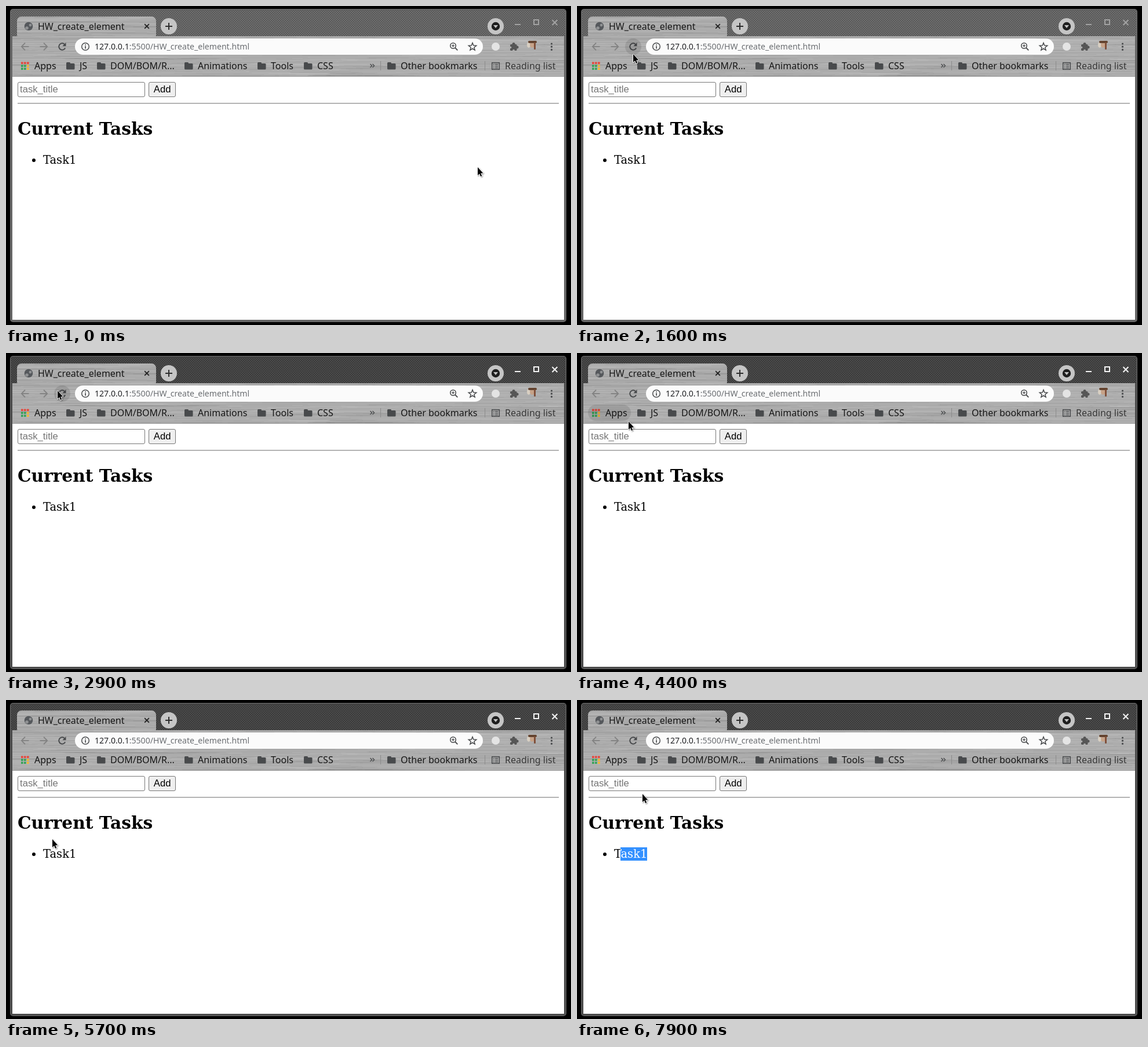
An HTML page with a canvas for the animation above (8000 ms loop, 975 by 550 pixels).

```html
<!DOCTYPE html>
<html lang="en">
<head>
<meta charset="utf-8">
<title>Task list</title>
<style>
html, body { margin: 0; width: 100%; height: 100%; overflow: hidden; background: #000; }
canvas { display: block; }
</style>
</head>
<body>
<canvas id="stage" width="975" height="550"></canvas>
<script>
const LOOP = 8000, STEP = 100, FOCUS_AT = 2900;
const W = 975, H = 550;
const UI = '"Noto Sans", sans-serif', LABEL = '16px ' + UI;
const SERIF = '"DejaVu Serif", serif', ITEM = '19.5px ' + SERIF;
const FORM = '16.67px "Liberation Sans", Arial, sans-serif';
const INK = '#484a4c', METAL = '#adadad';
const view = document.getElementById('stage').getContext('2d');
let c = view;

// Pointer key points: time, x, y
const PATH = [
  [100, 814, 278], [900, 337, 167], [1000, 272, 152], [1400, 102, 95],
  [1900, 89, 65], [2000, 84, 63], [2400, 89, 65], [3500, 89, 65],
  [4400, 89, 118], [5300, 85, 214], [5700, 80, 240], [6200, 88, 267],
  [6700, 176, 265], [7100, 133, 212], [7900, 113, 162]
];

function pointerAt(t) {
  const next = PATH.findIndex(k => k[0] >= t);
  const a = PATH[Math.max(next - 1, 0)], b = PATH[next];
  const p = Math.max(0, (t - a[0]) / (b[0] - a[0] || 1));
  const mix = i => Math.round(a[i] + (b[i] - a[i]) * p);
  return { x: mix(1), y: mix(2) };
}

const inside = (p, x, y, w, h) => p.x >= x && p.x < x + w && p.y >= y && p.y < y + h;

function rng(seed) {
  return () => (seed = (seed * 16807) % 2147483647) / 2147483647;
}

function rect(x, y, w, h, color) {
  c.fillStyle = color;
  c.fillRect(x, y, w, h);
}

function pill(x, y, w, h, r, color) {
  c.fillStyle = color;
  c.beginPath();
  c.roundRect(x, y, w, h, r);
  c.fill();
}

function disc(x, y, r, color, ry = r) {
  c.fillStyle = color;
  c.beginPath();
  c.ellipse(x, y, r, ry, 0, 0, Math.PI * 2);
  c.fill();
}

function stroke(color, width) {
  c.strokeStyle = color;
  c.lineWidth = width;
  c.stroke();
}

function ring(x, y, r, color, width) {
  c.beginPath();
  c.arc(x, y, r, 0, Math.PI * 2);
  stroke(color, width);
}

function line(color, width, ...pts) {
  c.beginPath();
  for (let i = 0; i < pts.length; i += 2) c.lineTo(pts[i], pts[i + 1]);
  stroke(color, width);
}

function poly(color, ...pts) {
  c.fillStyle = color;
  c.beginPath();
  for (let i = 0; i < pts.length; i += 2) c.lineTo(pts[i], pts[i + 1]);
  c.closePath();
  c.fill();
}

// Crossing strokes; turn them by 45 degrees for a close mark
function cross(x, y, r, color, width, angle = 0) {
  c.save();
  c.translate(x, y);
  c.rotate(angle);
  line(color, width, -r, 0, r, 0);
  line(color, width, 0, -r, 0, r);
  c.restore();
}

function chevron(x, y, dx, dy, color, width) {
  line(color, width, x - dx, y - dy, x, y, x - dx, y + dy);
}

function text(s, x, y, font, color) {
  c.font = font;
  c.fillStyle = color;
  c.fillText(s, x, y);
}

function titleBar(focused) {
  pill(7, 5, 960, 540, 5, '#6c6c6c');
  pill(8, 6, 958, 538, 4, focused ? '#4b4b4b' : '#666');
  rect(9, 7, 956, 45, focused ? '#434343' : '#676767');
  for (let y = 7; y < 52; y += 2)
    for (let x = 9 + y % 4 - 1; x < 964; x += 4) {
      rect(x, y, 2, 1, 'rgba(0,0,0,.28)');
      rect(x, y + 1, 2, 1, 'rgba(255,255,255,.1)');
    }
  const ink = focused ? '#f4f4f4' : '#a2a2a2';
  rect(878, 31, 10, 2, ink);
  c.strokeStyle = ink;
  c.lineWidth = 2;
  c.strokeRect(911, 24, 8, 8);
  cross(947, 28.5, 6.3, ink, 2, Math.PI / 4);
}

function brushedMetal() {
  const rand = rng(77);
  c.save();
  c.beginPath();
  c.roundRect(19, 18, 240, 40, 8);
  c.rect(11, 52, 952, 70);
  c.clip();
  rect(11, 18, 952, 104, METAL);
  for (let i = 0; i < 1100; i++) {
    const x = rand() * 1100 - 120, y = 18 + Math.floor(rand() * 104);
    rect(x, y, 40 + rand() * 220, 1, rand() < 0.5 ? 'rgba(255,255,255,.06)' : 'rgba(0,0,0,.045)');
  }
  rect(11, 121, 952, 1, '#989898');
  c.restore();
}

function tabStrip() {
  disc(39, 35, 7.3, '#55585c');
  disc(36, 38, 2.8, '#8f9193');
  disc(42, 33, 2.4, '#8f9193');
  text('HW_create_element', 55, 41, LABEL, '#161616');
  cross(243, 35, 5.4, '#222', 1.8, Math.PI / 4);
  for (const x of [281, 845]) disc(x, 35, 14, '#c5c5c5');
  cross(281, 35, 6, '#2d2d2d', 2);
  disc(845, 35, 7.2, '#1e1e1e');
  poly('#c5c5c5', 841, 33, 849, 33, 845, 38);
}

function arrowIcon(x, dir) {
  c.save();
  c.translate(x, 70);
  c.scale(dir, 1);
  line('#828282', 1.8, -6.5, 0, 6, 0);
  chevron(6.2, 0, 6.2, 6.3, '#828282', 1.8);
  c.restore();
}

function star(x, y) {
  c.beginPath();
  for (let i = 0; i < 10; i++) {
    const a = -Math.PI / 2 + i * Math.PI / 5, r = i % 2 ? 3 : 7;
    c.lineTo(x + r * Math.cos(a), y + r * Math.sin(a));
  }
  c.closePath();
  stroke(INK, 1.5);
}

function reloadIcon() {
  c.beginPath();
  c.arc(97, 70, 5.7, 0.45, Math.PI * 2 - 0.75);
  stroke(INK, 1.9);
  poly(INK, 103.5, 63, 103.5, 69.3, 97.3, 69.3);
}

function addressBar() {
  pill(119, 56, 704, 28, 14, '#fbfbfb');
  ring(137, 70, 6.3, INK, 1.5);
  rect(136.2, 69, 1.7, 4.6, INK);
  rect(136.2, 66.2, 1.7, 1.7, INK);
  const font = '14.1px ' + UI, host = '127.0.0.1';
  text(host, 153, 75, font, '#202124');
  text(':5500/HW_create_element.html', 153 + c.measureText(host).width, 75, font, '#6b6e72');
  ring(771.5, 68.5, 4.7, INK, 1.6);
  line(INK, 1.8, 775, 72, 779.3, 76.3);
  cross(771.5, 68.5, 2.5, INK, 1.2);
  star(805, 70.5);
}

function extensions() {
  disc(845, 70, 7, '#e4e4e4');
  pill(870, 66, 11.5, 11, 1.5, '#565656');
  disc(876, 65.5, 2.5, '#565656');
  disc(882, 71, 2.5, '#565656');
  disc(870.6, 71.5, 1.8, METAL);
  disc(876, 76.6, 1.8, METAL);
  // Profile picture as flat tones
  disc(902, 67, 3, '#d8cfc2', 5);
  disc(908, 67, 4, '#c6a288', 5);
  pill(901, 60, 15, 4, 2, '#63432f');
  pill(911, 63, 3, 12, 1, '#80503a');
  for (let i = -1; i < 2; i++) disc(941.5, 70.2 + i * 5.2, 1.6, INK);
}

function folder(x) {
  pill(x, 97, 7, 5, 1.5, INK);
  pill(x, 99, 14.5, 10.5, 1.5, INK);
}

function bookmarks() {
  const colors = ['#e8473c', '#35a457', '#f3b733'];
  for (let i = 0; i < 9; i++) {
    const row = Math.floor(i / 3), col = i % 3;
    rect(26 + col * 5, 96.5 + row * 5, 3.6, 3.6, colors[row && 1 + (col > 1)]);
  }
  text('Apps', 49, 109, LABEL, '#161616');
  const names = { JS: 104, 'DOM/BOM/R...': 157, Animations: 308, Tools: 434, CSS: 514, 'Other bookmarks': 658 };
  for (const name in names) {
    folder(names[name]);
    text(name, names[name] + 23, 109, LABEL, '#161616');
  }
  for (const x of [631.5, 635.5]) chevron(x, 103, 3, 3, INK, 1.4);
  for (const x of [646, 826]) rect(x, 95, 1, 16, '#8b8b8b');
  c.strokeStyle = INK;
  c.lineWidth = 1.5;
  c.strokeRect(838.7, 97.7, 12.6, 11.6);
  for (let y = 100; y < 108; y += 3) {
    rect(841, y, 1.5, 1.3, INK);
    rect(844, y, 5, 1.3, INK);
  }
  text('Reading list', 861, 109, LABEL, '#363636');
}

function page() {
  rect(11, 122, 952, 419, '#fff');
  rect(20, 167, 934, 1, '#9a9a9a');
  rect(20, 168, 934, 1, '#cfcfcf');
  text('Current Tasks', 20, 222, 'bold 29.65px ' + SERIF, '#000');
  disc(48, 266, 3, '#000');
}

function makeWindow(focused) {
  const layer = document.createElement('canvas');
  layer.width = W;
  layer.height = H;
  c = layer.getContext('2d');
  rect(0, 0, W, H, '#000');
  titleBar(focused);
  brushedMetal();
  tabStrip();
  arrowIcon(33, -1);
  arrowIcon(65, 1);
  reloadIcon();
  addressBar();
  extensions();
  bookmarks();
  page();
  c = view;
  return layer;
}

function control(x, w, fill, hover) {
  pill(x + 0.5, 131.5, w - 1, 25, 2.5, fill);
  stroke(hover ? '#4f4f4f' : '#767676', 1);
}

function form(p) {
  const onButton = inside(p, 246, 131, 47, 26);
  control(20, 220, '#fff', inside(p, 20, 131, 220, 26));
  control(246, 47, onButton ? '#e5e5e5' : '#efefef', onButton);
  text('task_title', 24, 149, FORM, '#757575');
  text('Add', 254.8, 149, FORM, '#000');
}

function task(t) {
  const word = 'Task1', x = 64, base = 272;
  text(word, x, base, ITEM, '#000');
  if (t < 6100) return;
  const full = c.measureText(word).width;
  const edge = i => x + full - c.measureText(word.slice(i)).width;
  const grip = pointerAt(Math.min(t, 6700)).x;
  const end = [1, 2, 3, 4, 5].map(edge)
    .reduce((a, b) => Math.abs(b - grip) < Math.abs(a - grip) ? b : a);
  const left = Math.floor(edge(1)), width = Math.round(end) - left;
  c.save();
  c.beginPath();
  c.rect(left, 254, width, 23);
  c.clip();
  rect(left, 254, width, 23, '#3390ff');
  text(word, x, base, ITEM, '#fff');
  c.restore();
}

function hovers(p) {
  const shade = 'rgba(0,0,0,.1)';
  if (Math.hypot(p.x - 97, p.y - 70) < 15) disc(97, 70, 14, shade);
  if (inside(p, 19, 89, 76, 30)) pill(19, 89, 74, 28, 14, shade);
  if (inside(p, 96, 89, 52, 28)) pill(96, 89, 52, 28, 14, shade);
}

function textBeam(color, width) {
  line(color, width, 0, -7.5, 0, 7.5);
  for (const y of [-7.5, 7.5]) line(color, width, -3, y, 3, y);
}

function pointer(p) {
  const overText = inside(p, 20, 131, 220, 26) || inside(p, 20, 197, 233, 30) || inside(p, 64, 254, 58, 23);
  c.save();
  c.translate(p.x, p.y);
  if (overText) {
    c.lineCap = 'square';
    textBeam('#fff', 3);
    textBeam('#000', 1.2);
  } else {
    const shape = [0, 0, 0, 14, 3.1, 11.3, 5.2, 16, 7.2, 15.1, 5.2, 10.6, 9.3, 10.3];
    c.shadowColor = 'rgba(0,0,0,.4)';
    c.shadowBlur = 2;
    c.shadowOffsetX = c.shadowOffsetY = 1;
    c.lineJoin = 'round';
    line('#fff', 1.8, ...shape, 0, 0);
    c.shadowColor = 'transparent';
    poly('#000', ...shape);
  }
  c.restore();
}

const idle = makeWindow(false), active = makeWindow(true);

function draw(now) {
  const t = Math.floor(now % LOOP / STEP) * STEP;
  const p = pointerAt(t);
  c.drawImage(t < FOCUS_AT ? idle : active, 0, 0);
  hovers(p);
  form(p);
  task(t);
  pointer(p);
}

let start;
function tick(now) {
  start ??= now;
  draw(now - start);
  requestAnimationFrame(tick);
}
draw(0);
requestAnimationFrame(tick);
</script>
</body>
</html>
```
